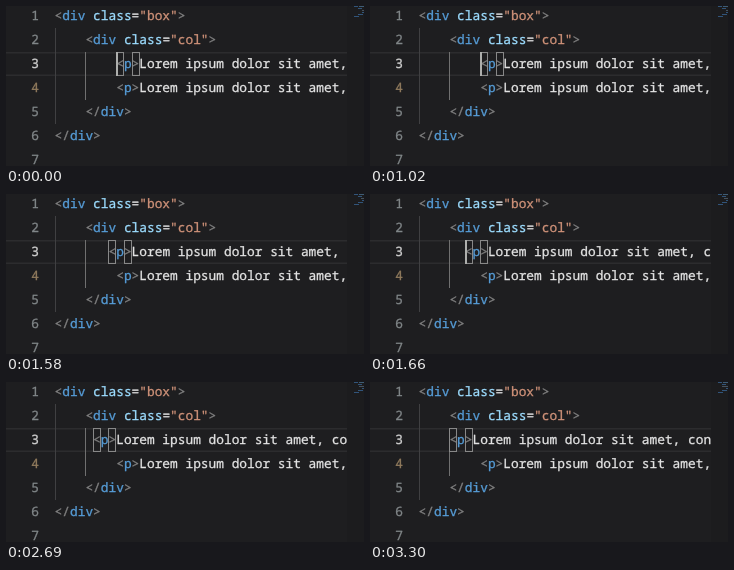
Animation, 358 px wide and 160 px high, one loop 3.8 s. Source, as an HTML page:

```html
<!DOCTYPE html>
<html lang="en">
<head>
<meta charset="utf-8">
<title>Outdenting a line</title>
<style>
  html, body { margin: 0; width: 100%; height: 100%; overflow: hidden; background: #1e1e20; }
  svg { display: block; width: 100%; height: 100%; }
  text {
    font: 12.83px "Noto Sans Mono", "DejaVu Sans Mono", monospace;
    text-rendering: geometricPrecision;
    white-space: pre;
    stroke-width: 0.3px;
  }
</style>
</head>
<body>
<svg id="stage" viewBox="0 0 358 160"></svg>
<script>
const NS = 'http://www.w3.org/2000/svg';
const LOOP = 3800, LEFT = 48.6, CHAR = 7.698, LINE = 24, EDGE = 341;
const C = {
  mark: '#808080', tag: '#569cd6', attr: '#9cdcfe', str: '#ce9178', text: '#e2e2e2',
  num: '#808688', changed: '#8f7a5c', active: '#d0d0d0', guide: '#404042', activeGuide: '#707070'
};
const LOREM = 'Lorem ipsum dolor sit amet, consectetur';

// start time, indent of the edited line, caret shown
const STEPS = [
  [0, 8, 1], [510, 8, 0], [1020, 8, 1], [1050, 7, 1], [1580, 7, 0],
  [1660, 6, 1], [2180, 5, 1], [2690, 5, 0], [2790, 4, 1], [3300, 4, 0]
];

const stage = document.getElementById('stage');
const colX = col => LEFT + col * CHAR;
const snapX = col => Math.round(colX(col));
const rowY = row => LINE * (row - 1) - 2;

function add(parent, name, attrs, content) {
  const el = document.createElementNS(NS, name);
  for (const key in attrs) el.setAttribute(key, attrs[key]);
  if (content) el.textContent = content;
  return parent.appendChild(el);
}

const rect = (parent, x, y, width, height, fill) =>
  add(parent, 'rect', { x, y, width, height, fill });

function codeLine(parent, row, col, parts) {
  const line = add(parent, 'text', { x: colX(col), y: rowY(row) + 16 });
  for (const [kind, str] of parts) add(line, 'tspan', { fill: C[kind], stroke: C[kind] }, str);
  return line;
}

const openDiv = name => [
  ['mark', '<'], ['tag', 'div'], ['text', ' '], ['attr', 'class'],
  ['text', '='], ['str', `"${name}"`], ['mark', '>']
];
const closeDiv = [['mark', '</'], ['tag', 'div'], ['mark', '>']];
const para = [['mark', '<'], ['tag', 'p'], ['mark', '>'], ['text', LOREM]];

// current line
rect(stage, 0, rowY(3), EDGE, 1.5, '#2c2c2e');
rect(stage, 0, rowY(4) - 1.5, EDGE, 1.5, '#2c2c2e');

// indent guides
rect(stage, snapX(0), rowY(2), 1, LINE * 4, C.guide);
const innerGuide = rect(stage, snapX(4), rowY(3), 1, LINE, C.activeGuide);
rect(stage, snapX(4), rowY(4), 1, LINE, C.activeGuide);

// gutter
const numColor = { 3: C.active, 4: C.changed };
for (let n = 1; n <= 7; n++) {
  const fill = numColor[n] || C.num;
  add(stage, 'text', { x: 33, y: rowY(n) + 16, 'text-anchor': 'end', fill, stroke: fill }, n);
}

// code
const clip = add(add(stage, 'defs'), 'clipPath', { id: 'pane' });
rect(clip, 0, 0, EDGE, 160);
const code = add(stage, 'g', { 'clip-path': 'url(#pane)' });
codeLine(code, 1, 0, openDiv('box'));
codeLine(code, 2, 4, openDiv('col'));
const edited = codeLine(code, 3, 8, para);
codeLine(code, 4, 8, para);
codeLine(code, 5, 4, closeDiv);
codeLine(code, 6, 0, closeDiv);

// bracket boxes and caret, kept on whole pixels
const boxes = [0, 2].map(() => add(code, 'rect', {
  y: rowY(3) + 0.5, width: 7, height: LINE - 1, fill: 'none', stroke: '#888888'
}));
const caret = rect(code, 0, rowY(3), 2, LINE, '#aeafad');

// minimap
rect(stage, EDGE, 0, 17, 160, '#1c1c1e');
const miniLine = (row, col, width, fill) => rect(stage, 348 + col, row * 2 - 2, width, 1, fill);
miniLine(1, 0, 4, '#31547a');
miniLine(1, 5, 5, '#3f5c74');
miniLine(2, 4, 4, '#31547a');
const miniEdited = miniLine(3, 0, 10, '#46525e');
miniLine(4, 8, 2, '#31547a');
miniLine(5, 4, 5, '#31547a');
miniLine(6, 0, 5, '#31547a');

function draw(t) {
  const [, col, shown] = STEPS.filter(step => step[0] <= t).pop();
  edited.setAttribute('x', colX(col));
  boxes.forEach((box, i) => box.setAttribute('x', snapX(col + 2 * i) + 0.5));
  caret.setAttribute('x', snapX(col));
  caret.setAttribute('opacity', shown);
  innerGuide.setAttribute('opacity', col > 4 ? 1 : 0);
  miniEdited.setAttribute('x', 348 + col);
}

const start = performance.now();
function tick() {
  draw((performance.now() - start) % LOOP);
  requestAnimationFrame(tick);
}
draw(0);
requestAnimationFrame(tick);
</script>
</body>
</html>
```
